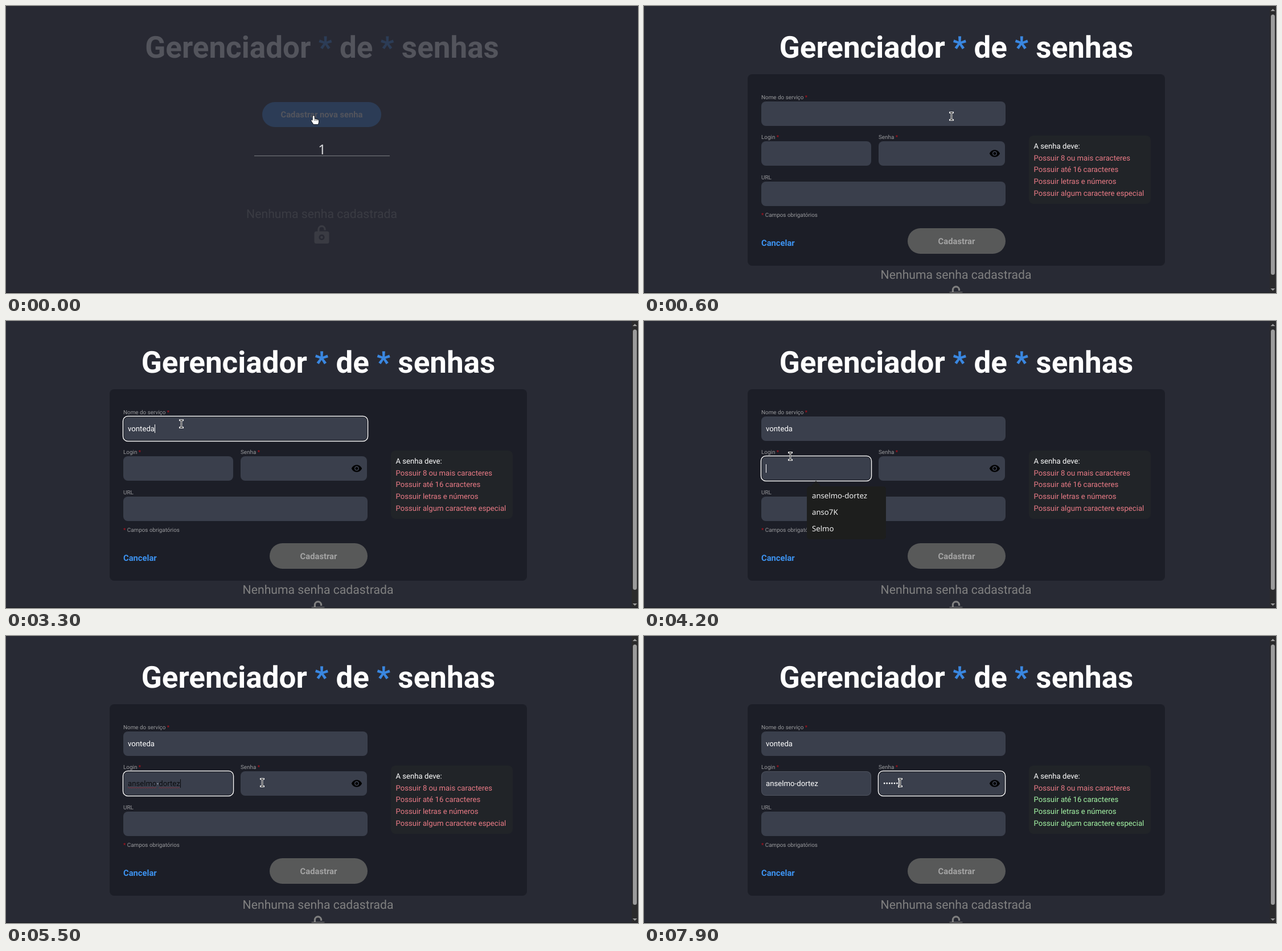
Recreate the animation shown at these times as an HTML page with a canvas. Size 1110 px wide and 505 px high, loop 8000 ms.

```html
<!DOCTYPE html>
<html lang="pt-BR">
<head>
<meta charset="utf-8">
<title>Gerenciador de senhas</title>
<style>
html, body { margin: 0; width: 100%; height: 100%; overflow: hidden; background: #282a34; }
canvas { display: block; width: 1110px; height: 505px; }
</style>
</head>
<body>
<canvas id="stage"></canvas>
<script>
const W = 1110, H = 505, LOOP = 8000;
const canvas = document.getElementById('stage');
const ratio = window.devicePixelRatio || 1;
canvas.width = W * ratio;
canvas.height = H * ratio;
const ctx = canvas.getContext('2d');

const SANS = 'Roboto, sans-serif';
const MENU = '"Noto Sans", "Open Sans", sans-serif';
const C = {
  page: '#282a34', card: '#1c1e27', field: '#3a3f4c', panel: '#212428',
  blue: '#3a87e0', link: '#3d93f1', label: '#98999c', star: '#b5101c',
  bad: '#ea7b86', good: '#a5f6a6', white: '#ffffff', ink: '#0b0c0f', gray: '#808080'
};

const SERVICE = 'vonteda', LOGIN = 'anselmo-dortez';
const MENU_ITEMS = [LOGIN, 'anso7K', 'Selmo'];
const FIELDS = {
  service: [206, 168, 429, 43],
  login: [206, 238, 193, 43],
  password: [412, 238, 222, 43],
  url: [206, 309, 429, 43]
};

// Typing: time of each keystroke
const SERVICE_KEYS = [2500, 2600, 2700, 2900, 3000, 3100, 3300];
const PASSWORD_KEYS = [6400, 6400, 6600, 6800, 7300, 7900];

// Pointer: time, x, y, shape
const POINTER = [
  [0, 541, 200, 'hand'], [600, 540, 194, 'beam'], [700, 505, 192, 'beam'],
  [800, 450, 188, 'beam'], [1000, 370, 184, 'beam'], [1100, 308, 181, 'beam'],
  [3800, 282, 272, 'beam'], [4000, 257, 238, 'beam'], [4500, 282, 268, 'beam'],
  [4600, 318, 288, 'arrow'], [4700, 330, 294, 'arrow'], [5200, 356, 288, 'beam'],
  [5300, 395, 274, 'beam'], [5400, 434, 262, 'beam'], [5500, 450, 258, 'beam']
];

const EYE = new Path2D('M12 4.5C7 4.5 2.73 7.61 1 12c1.73 4.39 6 7.5 11 7.5s9.27-3.11 11-7.5c-1.73-4.39-6-7.5-11-7.5z' +
  'M12 17c-2.76 0-5-2.24-5-5s2.24-5 5-5 5 2.24 5 5-2.24 5-5 5zm0-8c-1.66 0-3 1.34-3 3s1.34 3 3 3 3-1.34 3-3-1.34-3-3-3z');
const BEAM = new Path2D('M-2.5 -6.5H2.5M0 -6.5V6.5M-2.5 6.5H2.5');
const ARROW = new Path2D('M0 0V15L3.4 11.8L5.8 17.2L8.4 16L6 10.8H11Z');
const HAND = new Path2D('M-2.2 -5.5Q-2.2 -7 -0.8 -7Q0.7 -7 0.7 -5.5V-1.6L6 -0.6Q8 0 8 2V4.5Q7.6 6 7 8H-0.8L-4.4 2.6Q-5.2 1 -4 0.6Q-3 0.6 -2.2 2Z');

const between = (t, a, b) => t >= a && t < b;
const typed = (keys, t) => keys.filter(k => k <= t).length;

function box(x, y, w, h, r, color) {
  ctx.fillStyle = color;
  ctx.beginPath();
  ctx.roundRect(x, y, w, h, r);
  ctx.fill();
}

function outline(x, y, w, h, r, color, line) {
  ctx.strokeStyle = color;
  ctx.lineWidth = line;
  ctx.beginPath();
  ctx.roundRect(x, y, w, h, r);
  ctx.stroke();
}

function font(size, weight = 400, family = SANS) {
  ctx.font = `${weight} ${size}px ${family}`;
}

function text(str, x, y, color, align = 'left') {
  ctx.textAlign = align;
  ctx.fillStyle = color;
  ctx.fillText(str, x, y);
}

// Draws [string, color] pairs in a row
function runs(list, x, y) {
  for (const [str, color] of list) {
    text(str, x, y, color);
    x += ctx.measureText(str).width;
  }
}

function title(cx) {
  font(53, 700);
  const list = [['Gerenciador ', C.white], ['* ', C.blue], ['de ', C.white], ['* ', C.blue], ['senhas', C.white]];
  const width = list.reduce((sum, [str]) => sum + ctx.measureText(str).width, 0);
  runs(list, cx - width / 2, 91);
}

function emptyList(cx, y) {
  font(21.2);
  text('Nenhuma senha cadastrada', cx, y, C.gray, 'center');
  ctx.strokeStyle = C.gray;
  ctx.lineWidth = 3.2;
  ctx.beginPath();
  ctx.moveTo(cx - 5.6, y + 25);
  ctx.lineTo(cx - 5.6, y + 20);
  ctx.arc(cx, y + 20, 5.6, Math.PI, 0);
  ctx.lineTo(cx + 5.6, y + 21.5);
  ctx.stroke();
  box(cx - 13, y + 23.5, 26, 21.5, 3.5, C.gray);
  ctx.strokeStyle = C.page;
  ctx.lineWidth = 2.8;
  ctx.beginPath();
  ctx.arc(cx, y + 34, 3.7, 0, Math.PI * 2);
  ctx.stroke();
}

function home(t) {
  title(555);
  box(450, 169, 209, 44, 22, C.blue);
  font(14.75, 700);
  text('Cadastrar nova senha', 554.5, 196, C.white, 'center');
  emptyList(554.5, 373);

  const dim = t < 200 ? 0.8 : t < 300 ? 0.4 : 0;
  ctx.globalAlpha = dim;
  box(0, 0, W, H, 0, C.page);
  ctx.globalAlpha = 1;
  if (t < 200) {
    font(24, 400, MENU);
    text('1', 555, 261, '#d8d9db', 'center');
    box(436, 263, 238, 1.2, 0, '#6d6f74');
  }
}

function scrollbar() {
  box(1099, 0, 11, H, 0, '#2b2b2c');
  box(1101, 15, 7, 458, 3.5, '#9b9b9b');
  ctx.fillStyle = '#9b9b9b';
  for (const [y, d] of [[9, -4], [497, 4]]) {
    ctx.beginPath();
    ctx.moveTo(1100.5, y);
    ctx.lineTo(1108.5, y);
    ctx.lineTo(1104.5, y + d);
    ctx.fill();
  }
}

function focusRing([x, y, w, h]) {
  outline(x + 0.8, y + 0.8, w - 1.6, h - 1.6, 7, '#15171d', 1.2);
  outline(x - 0.5, y - 0.5, w + 1, h + 1, 8.5, '#f4f4f5', 1.5);
}

function caret(x, y, color = C.white) {
  box(Math.round(x), y - 7.5, 1, 15, 0, color);
}

function squiggle(x0, x1, y) {
  ctx.strokeStyle = 'rgba(170, 40, 50, 0.6)';
  ctx.lineWidth = 1;
  ctx.beginPath();
  for (let x = x0; x <= x1; x++) ctx.lineTo(x, y + Math.sin(x * Math.PI / 2) * 0.8);
  ctx.stroke();
}

function loginText(t) {
  if (t < 4900) return;
  font(13.2);
  const filling = t < 6000;
  const [first, last] = LOGIN.split('-');
  const color = filling ? C.ink : C.white;
  runs([[first, color], ['-', filling ? '#bcc2cc' : C.white], [last, color]], 214, 264);
  if (between(t, 5100, 6000)) {
    const end = 214 + ctx.measureText(LOGIN).width;
    squiggle(214, 214 + ctx.measureText(first).width, 267);
    squiggle(214 + ctx.measureText(first + '-').width, end, 267);
    caret(end, 259.5, C.ink);
  }
}

function rules(t) {
  box(676, 228, 214, 120, 8, C.panel);
  font(13.15);
  text('A senha deve:', 684.5, 250.5, C.white);
  [
    ['Possuir 8 ou mais caracteres', LOOP],
    ['Possuir até 16 caracteres', 6400],
    ['Possuir letras e números', 7900],
    ['Possuir algum caractere especial', 7900]
  ].forEach(([str, met], i) => text(str, 684.5, 271.7 + i * 20.7, t >= met ? C.good : C.bad));
}

function menu(t) {
  const color = '#1d1e1d';
  ctx.fillStyle = color;
  ctx.beginPath();
  ctx.moveTo(302, 281);
  ctx.lineTo(293, 292);
  ctx.lineTo(311, 292);
  ctx.fill();
  box(286, 291, 139, 93, 5, color);
  if (t >= 4900) box(290, 293, 131, 29, 4, '#3a3b3a');
  font(13.2, 400, MENU);
  MENU_ITEMS.forEach((str, i) => text(str, 295, 311.5 + i * 29.4, '#f2f2f2'));
}

function form(t) {
  title(548.5);
  emptyList(548, 479.5);
  box(182, 120, 733, 337, 8, C.card);

  font(9.9);
  const star = [' *', C.star];
  runs([['Nome do serviço', C.label], star], 206, 164);
  runs([['Login', C.label], star], 206, 234.3);
  runs([['Senha', C.label], star], 412, 234.3);
  runs([['URL', C.label]], 206, 304.6);
  runs([['* ', C.star], ['Campos obrigatórios', C.label]], 206, 371);

  for (const f of Object.values(FIELDS)) box(...f, 8, C.field);
  if (t >= 6000) outline(206.5, 238.5, 192, 42, 7.5, 'rgba(255,255,255,0.1)', 1);

  const focus = t < 1200 ? null : t < 4100 ? 'service' : t < 6000 ? 'login' : 'password';
  if (focus) focusRing(FIELDS[focus]);

  font(13.2);
  const word = SERVICE.slice(0, typed(SERVICE_KEYS, t));
  text(word, 214, 194, C.white);
  if (focus === 'service' && !between(t, 1800, 2400)) caret(214 + ctx.measureText(word).width, 189.5);
  if (between(t, 4100, 4700)) caret(214, 259.5);
  loginText(t);

  const dots = '•'.repeat(typed(PASSWORD_KEYS, t));
  font(13.2);
  text(dots, 420, 264, C.white);
  if (focus === 'password') caret(420 + ctx.measureText(dots).width, 259.5);

  ctx.save();
  ctx.translate(606, 249.5);
  ctx.scale(0.83, 0.83);
  ctx.fillStyle = '#000';
  ctx.fill(EYE, 'evenodd');
  ctx.restore();

  rules(t);
  font(14.75, 700);
  text('Cancelar', 206, 421.5, C.link);
  box(463, 391, 172, 45, 22.5, '#585959');
  text('Cadastrar', 549, 419, '#a4a4a4', 'center');

  scrollbar();
  if (between(t, 4200, 5100)) menu(t);
}

function pointer(t) {
  const [, x, y, shape] = POINTER.filter(p => p[0] <= t).pop();
  ctx.save();
  ctx.translate(x, y);
  if (shape === 'beam') {
    ctx.strokeStyle = '#fff';
    ctx.lineWidth = 2.8;
    ctx.lineCap = 'square';
    ctx.stroke(BEAM);
    ctx.strokeStyle = '#000';
    ctx.lineWidth = 1;
    ctx.lineCap = 'butt';
    ctx.stroke(BEAM);
  } else {
    const path = shape === 'hand' ? HAND : ARROW;
    ctx.strokeStyle = '#16171b';
    ctx.lineWidth = 1.6;
    ctx.stroke(path);
    ctx.fillStyle = '#fff';
    ctx.fill(path);
    if (shape === 'hand') {
      ctx.lineWidth = 0.7;
      ctx.beginPath();
      for (const k of [0.9, 3.3, 5.7]) {
        ctx.moveTo(k, -1);
        ctx.lineTo(k, 2.2);
      }
      ctx.stroke();
    }
  }
  ctx.restore();
}

function draw(t) {
  ctx.setTransform(ratio, 0, 0, ratio, 0, 0);
  ctx.textRendering = 'geometricPrecision';
  ctx.lineCap = 'butt';
  box(0, 0, W, H, 0, C.page);
  if (t < 600) home(t); else form(t);
  box(0, 504, W, 1, 0, '#1a1b20');
  pointer(t);
}

const start = performance.now();
function tick() {
  draw((performance.now() - start) % LOOP);
  requestAnimationFrame(tick);
}
tick();
</script>
</body>
</html>
```
